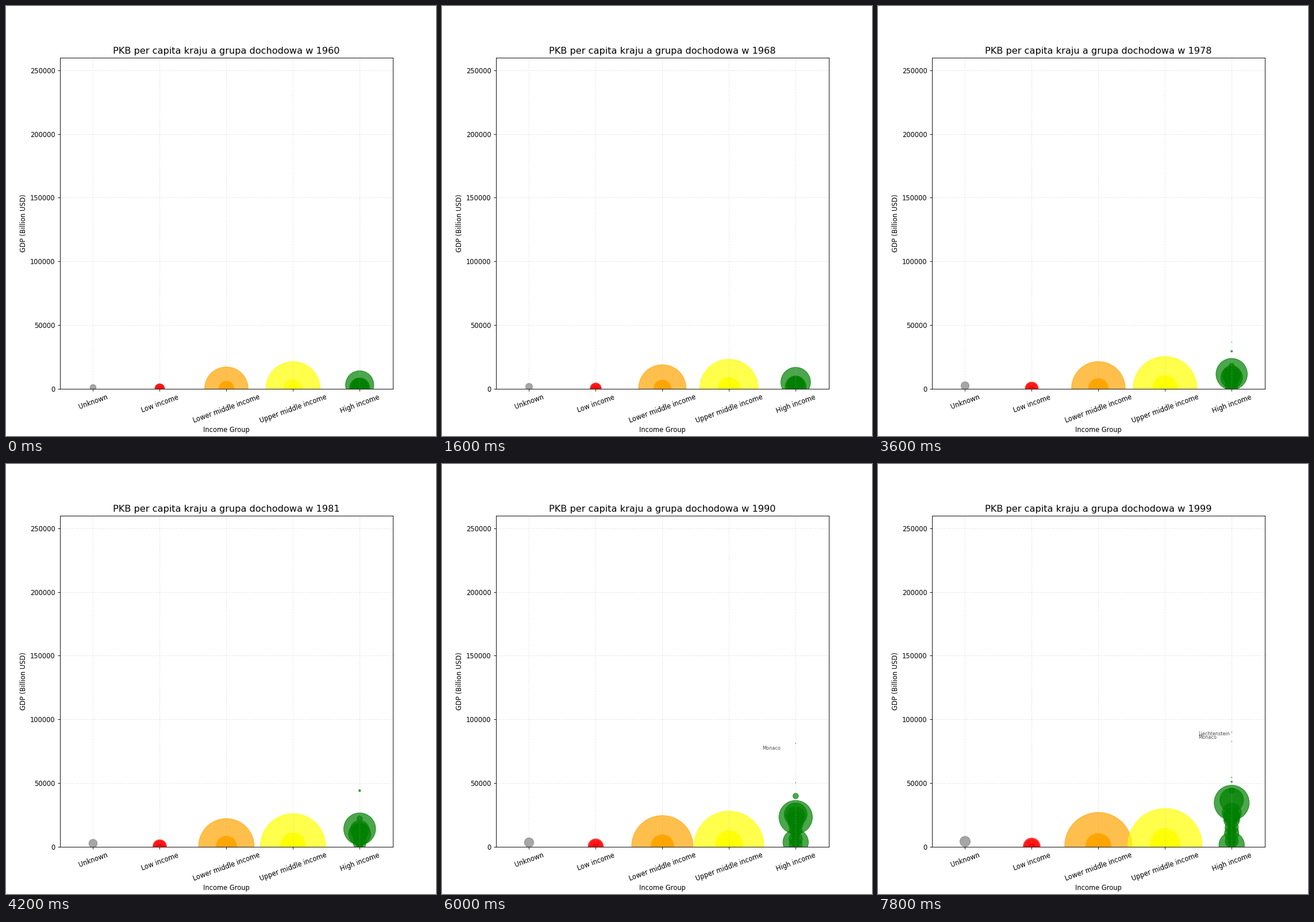
Recreate the animation shown at these times as a matplotlib script. Size 748x748 px, loop 8000 ms.

```python
import numpy as np
import matplotlib.pyplot as plt
from matplotlib.animation import FuncAnimation
from matplotlib.colors import to_rgba

SIZE = 748
FIRST, LAST = 1960, 1999
YEARS = np.arange(FIRST, LAST + 1)
GROUPS = ["Unknown", "Low income", "Lower middle income",
          "Upper middle income", "High income"]
COLORS = ["gray", "red", "orange", "yellow", "green"]
UNKNOWN, LOW, LOWER, UPPER, HIGH = range(5)
LABEL_MIN = 75000

bubbles = []


def ease(a, b, power=1, start=FIRST):
    """Growth from a in the start year to b in the last one."""
    u = np.clip((YEARS - start) / (LAST - start), 0, 1)
    return a + (b - a) * u ** power


def keys(*points):
    years, values = zip(*points)
    return np.interp(YEARS, years, values)


def bubble(group, people, gdp, start=FIRST, bend=1, name="", shift=0):
    """people: first and last population in millions; the radius grows evenly."""
    width = ease(*np.sqrt(people), bend, start)
    gdp = np.where(YEARS < start, np.nan, gdp)
    bubbles.append((group, 10 * width ** 2, gdp, name, shift))


# Small countries filling each column
rng = np.random.default_rng(7)
for group, count, people, income in [(LOW, 15, 8, 400), (LOWER, 25, 25, 1500),
                                     (UPPER, 25, 35, 4500), (HIGH, 40, 13, 22000)]:
    for _ in range(count):
        p = people * rng.uniform(0.1, 1)
        end = income * rng.uniform(0.1, 1)
        bubble(group, (0.5 * p, p), ease(0.08 * end, end, 1.7))

bubble(UNKNOWN, (8.1, 24), ease(950, 4100, 1.1))

bubble(LOW, (15, 48), ease(220, 100))
bubble(LOW, (21, 65), ease(120, 150))

for people in [(48, 128), (45, 120), (50, 147), (27, 77)]:
    bubble(LOWER, people, ease(90, 500))
bubble(LOWER, (427, 1030), ease(83, 440), bend=1.1)

bubble(UPPER, (72, 173), ease(210, 3700, 1.2))
bubble(UPPER, (108, 209), ease(55, 700), start=1967)
bubble(UPPER, (664, 1250), ease(89, 870, 2), bend=0.95)

# European incomes in dollars share one cycle
cycle = keys((1960, 0.05), (1970, 0.13), (1978, 0.42), (1980, 0.55), (1984, 0.41),
             (1985, 0.43), (1990, 0.93), (1994, 0.99), (1995, 1.12), (1997, 0.99),
             (1999, 1.03))
for people, level in [((72, 82), 26000), ((52, 59), 23500), ((47, 59), 23000),
                      ((50, 57), 20500), ((30, 40), 14500), ((5.3, 7.1), 42800)]:
    bubble(HIGH, people, level * cycle)
bubble(HIGH, (0.02, 0.032), 87300 * cycle, start=1970, name="Monaco", shift=-5000)
bubble(HIGH, (0.02, 0.032), ease(7000, 82600, 1.5, 1970), start=1970,
       name="Liechtenstein", shift=5000)
bubble(HIGH, (0.3, 0.43), ease(2200, 51000, 1.7))
bubble(HIGH, (0.045, 0.062), ease(1900, 54400, 2.5))
bubble(HIGH, (0.4, 3), keys((1975, 26800), (1978, 29400), (1981, 44000),
                            (1986, 25500), (1999, 27000)), start=1975)
bubble(HIGH, (25, 46.6), ease(158, 10600, 2.2))
bubble(HIGH, (38.1, 38.7), ease(1700, 4400, start=1990), start=1990)
bubble(HIGH, (147, 147), ease(3700, 1330, 1.5, 1988), start=1988)
bubble(HIGH, (93, 126.7), keys((1960, 475), (1968, 1450), (1978, 8800), (1985, 11600),
                               (1988, 25000), (1990, 25400), (1995, 44200),
                               (1998, 32400), (1999, 36600)))
bubble(HIGH, (180.7, 279), ease(3007, 34514, 1.7))

fig, ax = plt.subplots(figsize=(9, 9), dpi=SIZE / 9)
ax.set_xlim(-0.5, 4.5)
ax.set_ylim(0, 260000)
ax.set_xticks(range(5), GROUPS, rotation=20)
ax.set_xlabel("Income Group", labelpad=2.8)
ax.set_ylabel("GDP (Billion USD)")
ax.grid(True, linestyle="--", alpha=0.3)
title = ax.set_title("", fontsize=14)

groups, sizes, gdps, names, shifts = zip(*bubbles)
sizes, gdps = np.array(sizes), np.array(gdps)
dots = ax.scatter(groups, np.zeros(len(groups)), s=sizes[:, 0],
                  c=[to_rgba(COLORS[g], 0.7) for g in groups])
labels = {i: ax.text(groups[i] - 0.5, 0, name, fontsize=7, alpha=0.7)
          for i, name in enumerate(names) if name}


def draw(n):
    dots.set_offsets(np.column_stack([groups, gdps[:, n]]))
    dots.set_sizes(sizes[:, n])
    for i, label in labels.items():
        y = gdps[i, n]
        label.set_visible(bool(y > LABEL_MIN))
        label.set_y(np.nan_to_num(y) + shifts[i])
    title.set_text(f"PKB per capita kraju a grupa dochodowa w {YEARS[n]}")
    return [dots, title, *labels.values()]


anim = FuncAnimation(fig, draw, frames=len(YEARS), interval=200, repeat=True)
plt.show()
```
